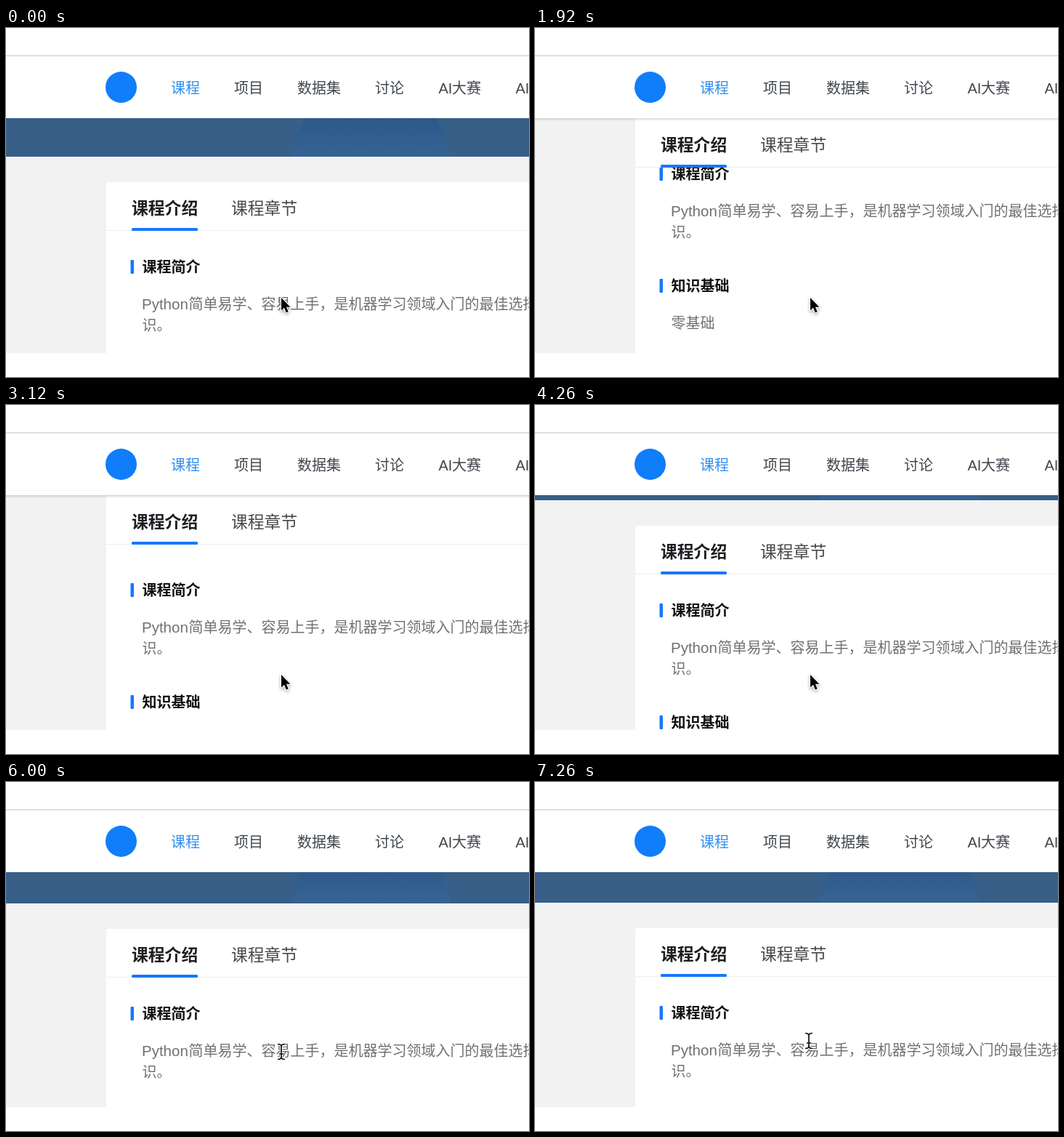
An HTML page with a canvas for the animation above (7320 ms loop, 720 by 480 pixels).

```html
<!DOCTYPE html>
<html lang="zh-CN">
<head>
<meta charset="utf-8">
<style>
  html, body { margin: 0; width: 720px; height: 480px; overflow: hidden; background: #fff; }
  canvas { display: block; }
</style>
</head>
<body>
<canvas id="stage" width="720" height="480"></canvas>
<script>
const ctx = document.getElementById('stage').getContext('2d');
const LOOP = 7320, STEP = 60;
const HEADER = 124, BOTTOM = 447, CARD_X = 138, PIN_AT = 53;
const BLUE = '#1677ff';
const CJK = '"Noto Sans CJK SC", "Noto Sans CJK", sans-serif';
const LATIN = '"Liberation Sans", Arial, sans-serif';

// Scroll offset over time: [ms, px]
const scrollKeys = [[0, 0], [720, 36], [1920, 128], [3120, 74], [3900, 55],
  [4320, 46], [4740, 55], [5160, 55], [6000, 10], [7260, 11]];

const slope = (a, b) => (b[1] - a[1]) / (b[0] - a[0]);

function tangent(keys, i) {
  if (i === 0 || i === keys.length - 1) return 0;
  const a = slope(keys[i - 1], keys[i]), b = slope(keys[i], keys[i + 1]);
  return a * b <= 0 ? 0 : 2 * a * b / (a + b);
}

// Monotone cubic through the keys
function curve(keys, t) {
  const last = keys.length - 1;
  if (t >= keys[last][0]) return keys[last][1];
  let i = 0;
  while (t >= keys[i + 1][0]) i++;
  const [t0, v0] = keys[i], [t1, v1] = keys[i + 1];
  const h = t1 - t0, u = (t - t0) / h, w = 1 - u;
  return v0 * (1 + 2 * u) * w * w + v1 * u * u * (3 - 2 * u)
    + h * u * w * (w * tangent(keys, i) - u * tangent(keys, i + 1));
}

function rect(x, y, w, h, fill) {
  ctx.fillStyle = fill;
  ctx.fillRect(x, y, w, h);
}

function pill(x, y, w, h, r, fill) {
  ctx.fillStyle = fill;
  ctx.beginPath();
  ctx.roundRect(x, y, w, h, r);
  ctx.fill();
}

function disc(x, y, r, fill) {
  ctx.fillStyle = fill;
  ctx.beginPath();
  ctx.arc(x, y, r, 0, Math.PI * 2);
  ctx.fill();
}

// y is the middle of the line; the baseline sits on a whole pixel
function label(str, x, y, size, color, weight = 400, family = CJK) {
  ctx.font = `${weight} ${size}px ${family}`;
  ctx.fillStyle = color;
  ctx.fillText(str, x, Math.floor(y + size * 0.38));
}

function clipped(x, y, w, h, draw) {
  ctx.save();
  ctx.beginPath();
  ctx.rect(x, y, w, h);
  ctx.clip();
  draw();
  ctx.restore();
}

function drawBanner(s) {
  const h = 177 - s - HEADER;
  if (h <= 0) return;
  clipped(0, HEADER, 720, h, () => {
    rect(0, HEADER, 720, h, '#375f88');
    const g = ctx.createLinearGradient(0, HEADER - s, 0, 180 - s);
    g.addColorStop(0, '#2c598b');
    g.addColorStop(1, '#376493');
    disc(502, 187 - s, 110, g);
  });
}

function heading(str, y) {
  pill(171.5, y - 9.5, 4.5, 19, 1, BLUE);
  label(str, 187.5, y, 20, '#111', 700);
}

function drawContent(s) {
  const gray = '#707070';
  pill(CARD_X, 212 - s, 600, 500, 3, '#fff');
  heading('课程简介', 328.5 - s);
  label('Python', 187, 380 - s, 20.5, gray, 400, LATIN);
  label('简单易学、容易上手，是机器学习领域入门的最佳选择', 251.5, 380 - s, 20, gray);
  label('识。', 187.5, 408.5 - s, 20, gray);
  heading('知识基础', 482.5 - s);
  label('零基础', 187.5, 533.5 - s, 20, gray);
}

function drawTabs(top) {
  pill(CARD_X, top, 600, 67, 3, '#fff');
  rect(CARD_X, top + 66, 600, 1, '#eee');
  label('课程介绍', 173, top + 35.5, 22.8, '#1c1e21', 700);
  label('课程章节', 310, top + 35.5, 22.8, '#484848');
  pill(173, top + 63, 91, 4, 1.5, BLUE);
}

function drawHeader(pinned) {
  if (pinned) {
    const g = ctx.createLinearGradient(0, HEADER, 0, HEADER + 4);
    g.addColorStop(0, 'rgba(0,0,0,.15)');
    g.addColorStop(1, 'rgba(0,0,0,0)');
    rect(0, HEADER, 720, 4, g);
  }
  rect(0, 0, 720, HEADER, '#fff');
  rect(0, 37.5, 720, 1.3, '#cfcfcf');
  disc(158.5, 81.5, 21.5, '#107dfa');
  const ink = '#41464d';
  label('课程', 227, 83, 20, '#318ff0');
  label('项目', 314, 83, 20, ink);
  label('数据集', 401, 83, 20, ink);
  label('讨论', 508, 83, 20, ink);
  label('AI', 595.5, 83, 20, ink, 400, LATIN);
  label('大赛', 614, 83, 20, ink);
  label('AI', 701.5, 83, 20, ink, 400, LATIN);
}

function drawArrow(x, y) {
  const p = new Path2D('M0 0V17.4L4 13.8L6.8 20.5L9.7 19.2L6.9 12.7H12.4Z');
  ctx.save();
  ctx.translate(x, y);
  ctx.lineJoin = 'round';
  ctx.lineWidth = 2.2;
  ctx.strokeStyle = '#fff';
  ctx.shadowColor = 'rgba(0,0,0,.35)';
  ctx.shadowBlur = 4;
  ctx.shadowOffsetY = 2;
  ctx.stroke(p);
  ctx.shadowColor = 'transparent';
  ctx.fillStyle = '#000';
  ctx.fill(p);
  ctx.restore();
}

function drawBeam(x, y) {
  const p = new Path2D('M-5 -10.5Q0 -10.5 0 -7V7Q0 10.5 -5 10.5M5 -10.5Q0 -10.5 0 -7M0 7Q0 10.5 5 10.5M-3 3H3');
  ctx.save();
  ctx.translate(x, y);
  for (const [width, color] of [[3.6, '#fff'], [1.7, '#111']]) {
    ctx.lineWidth = width;
    ctx.strokeStyle = color;
    ctx.stroke(p);
  }
  ctx.restore();
}

function drawCursor(t) {
  if (t < 5880) return drawArrow(379, 371);
  const u = Math.min(1, Math.max(0, (t - 6660) / 600));
  const e = u * u * (3 - 2 * u);
  drawBeam(379 - 2 * e, 371 - 15 * e);
}

function render(t) {
  const s = Math.round(curve(scrollKeys, t)), pinned = s > PIN_AT;
  rect(0, 0, 720, 480, '#fff');
  clipped(0, 0, 720, BOTTOM, () => {
    rect(0, HEADER, 720, BOTTOM - HEADER, '#f2f2f2');
    drawBanner(s);
    drawContent(s);
    drawTabs(pinned ? 125 : 212 - s);
    drawHeader(pinned);
  });
  drawCursor(t);
}

const start = performance.now();
function tick() {
  const t = (performance.now() - start) % LOOP;
  render(Math.floor(t / STEP) * STEP);
  requestAnimationFrame(tick);
}
tick();
</script>
</body>
</html>
```
